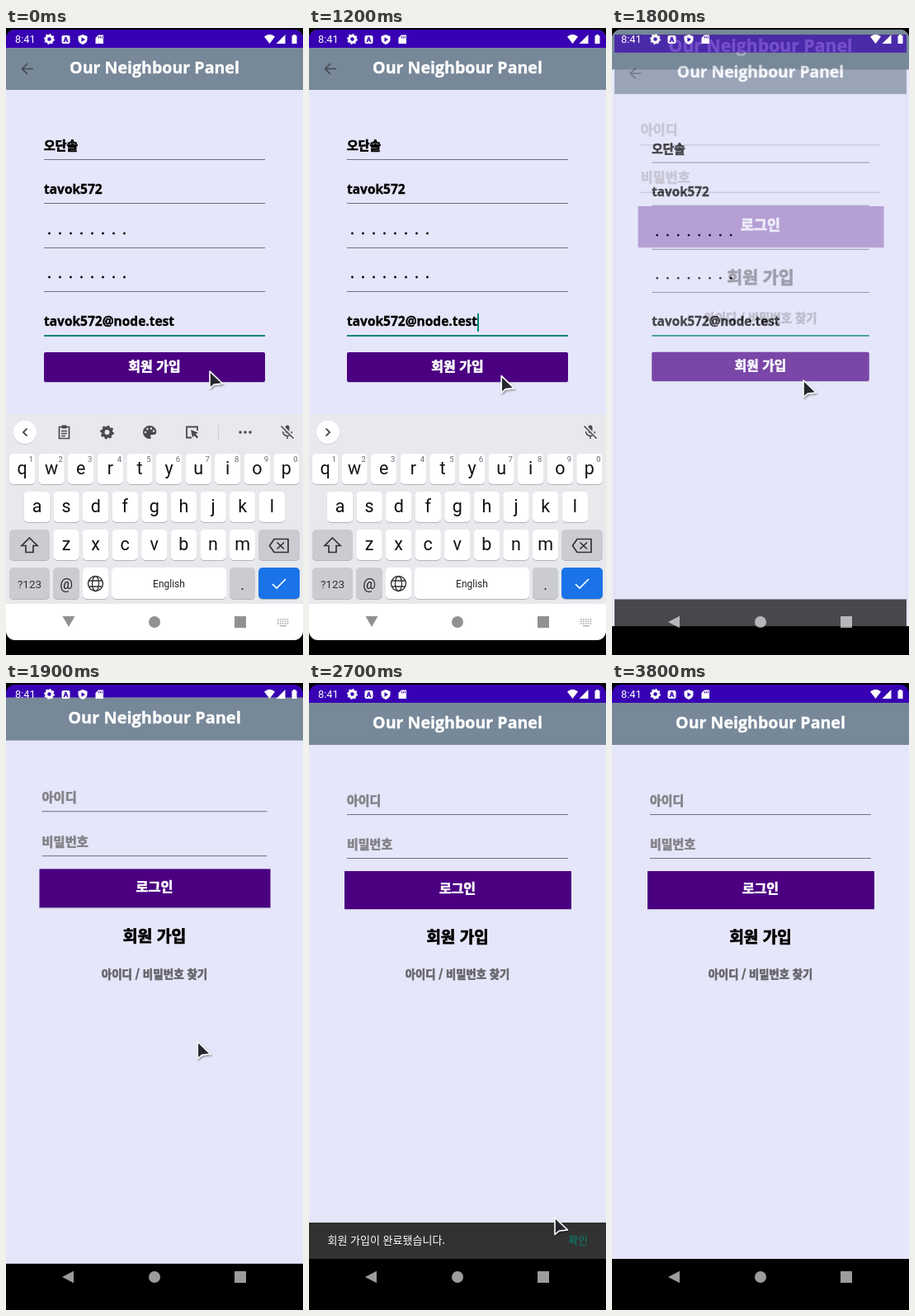
Recreate the animation shown at these times as an HTML page. Size 360x760 px, loop 4.5 s.

```html
<!DOCTYPE html>
<html lang="ko">
<head>
<meta charset="utf-8">
<title>Sign up</title>
<style>
  html, body { margin: 0; width: 100%; height: 100%; overflow: hidden; background: #000; }
  svg { display: block; width: 360px; height: 760px; }
  text { white-space: pre; }
  .bold { font-family: "Open Sans", "Noto Sans CJK KR", "Noto Sans CJK", sans-serif; font-weight: 700; stroke-width: .35; }
  .ko { font-family: "Noto Sans CJK KR", "Noto Sans CJK", sans-serif; font-weight: 900; stroke-width: .7; }
  .thin { font-family: "Noto Sans CJK KR", "Noto Sans CJK", sans-serif; font-weight: 400; stroke: none; }
  .key { font-family: Roboto, sans-serif; stroke: none; }
  .mid { text-anchor: middle; }
</style>
</head>
<body>
<svg id="stage" viewBox="0 0 360 760" xmlns="http://www.w3.org/2000/svg"></svg>
<script>
const LOOP = 4500, STEP = 100;
const INDIGO = '#4b0082', LAVENDER = '#e6e6fa', TEAL = '#018577', INK = '#4a4b50';

const rect = (x, y, w, h, fill, r = 0, more = '') =>
  `<rect x="${x}" y="${y}" width="${w}" height="${h}" rx="${r}" fill="${fill}" ${more}/>`;
const text = (s, x, y, size, color, cls) =>
  `<text x="${x}" y="${y}" font-size="${size}" fill="${color}" stroke="${color}" class="${cls}">${s}</text>`;
const circle = (x, y, r, fill, more = '') =>
  `<circle cx="${x}" cy="${y}" r="${r}" fill="${fill}" ${more}/>`;
const fillPath = (d, fill, more = '') => `<path d="${d}" fill="${fill}" ${more}/>`;
const linePath = (d, color, w) =>
  `<path d="${d}" fill="none" stroke="${color}" stroke-width="${w}"/>`;
const group = (id, body, more = '') => `<g id="${id}" ${more}>${body}</g>`;
const gear = (x, y, r, color) =>
  circle(x, y, r * .62, 'none', `stroke="${color}" stroke-width="${r * .5}"`) +
  circle(x, y, r * .86, 'none',
    `stroke="${color}" stroke-width="${r * .36}" pathLength="16" stroke-dasharray="1"`);

// App screens
const base = () =>
  rect(0, 2, 360, 758, '#000') +
  rect(0, 2, 360, 22, '#3700b3') +
  rect(0, 24, 360, 674, LAVENDER) +
  rect(0, 24, 360, 51, '#778899') +
  text('Our Neighbour Panel', 180, 55, 19.6, '#fff', 'bold mid');
const underline = y => rect(46, y, 268, 1, '#716f80');
const raised = (x, y, w, h, r) =>
  rect(x, y + 1, w, h, '#000', r, 'opacity=".2"') + rect(x, y, w, h, INDIGO, r);

const login = base() +
  text('아이디', 46, 148, 15, '#828288', 'ko') + underline(159) +
  text('비밀번호', 46, 201, 15, '#828288', 'ko') + underline(212) +
  raised(43, 228, 275, 46, 0) +
  text('로그인', 180, 255, 16, '#fff', 'ko mid') +
  text('회원 가입', 180, 315, 19, '#000', 'ko mid') +
  text('아이디 / 비밀번호 찾기', 180, 358, 13.3, '#66666c', 'ko mid');

const dots = y => Array.from({ length: 8 }, (_, i) => circle(52.5 + 13 * i, y, 1.4, '#000')).join('');
const form = base() +
  linePath('M33 49.5H19.5M26 43L19.5 49.5L26 56', '#44494f', 1.7) +
  text('오단솔', 46, 148, 14.9, '#000', 'ko') + underline(159) +
  text('tavok572', 46, 201, 15.5, '#000', 'bold') + underline(212) +
  dots(249) + underline(266) +
  dots(302) + underline(319) +
  text('tavok572@node.test', 46, 361, 15.5, '#000', 'bold') +
  rect(46, 372, 268, 2, TEAL) +
  rect(204, 346, 2, 22, TEAL, 0, 'id="caret"') +
  raised(46, 393, 268, 36, 2) +
  group('ripple', circle(232, 421, 120, '#000', 'opacity=".17"'), 'clip-path="url(#button)"') +
  text('회원 가입', 180, 415.5, 16, '#fff', 'ko mid');

const snack =
  rect(0, 654, 360, 44, '#323232') +
  group('snackText',
    text('회원 가입이 완료됐습니다.', 22.5, 680.3, 13, '#fff', 'thin') +
    text('확인', 314.5, 680.3, 12.7, TEAL, 'thin'));

// Keyboard
const GRAY = '#cbccd1', BOARD = '#e8e9ed';
const cap = (x, y, w, fill = '#fff', h = 37) =>
  rect(x, y + 1, w, h, '#b4b5ba', 5) + rect(x, y, w, h, fill, 5);
const row = (letters, x, y) => [...letters].map((c, i) => {
  const mid = x + 35.6 * i;
  return cap(mid - 15.7, y, 31.4) + text(c, mid, y + 25, 21.5, '#111', 'key mid');
}).join('');
const digits = [...'1234567890'].map((c, i) =>
  text(c, 30.5 + 35.6 * i, 526, 9.5, '#66686d', 'key mid')).join('');

const tools =
  // clipboard
  linePath('M64.5 483.5H76.5V497.5H64.5Z', INK, 1.7) + rect(67.5, 481.5, 6, 4, INK) +
  linePath('M67 488.5H74M67 491.5H74M67 494.5H72', INK, 1.3) +
  gear(122.5, 490, 8, INK) +
  // palette
  fillPath('M174 482a8 8 0 1 0 0 16c2 0 2-1.5 1.3-2.5c-.7-1.4 0-2.5 1.5-2.5h2a3.5 3.5 0 0 0 3.5-3.5c0-4.3-3.7-7.5-8.3-7.5z', INK) +
  [[169, 490], [171.5, 486], [176, 485.5], [179, 488.5]].map(p => circle(...p, 1.2, BOARD)).join('') +
  // touch panel
  linePath('M232 488V483.5H219V496.5H225', INK, 1.8) +
  fillPath('M224 487L233 490.5L230 492L233 496L231.5 497.5L228 494L226 496.5Z', INK) +
  rect(257, 481, 1, 18, '#cfd0d5') +
  [284, 290, 296].map(x => circle(x, 490, 1.8, INK)).join('');

const mic =
  rect(338.5, 481.5, 5, 10, INK, 2.5) +
  linePath('M335.5 489a5.5 5.5 0 0 0 11 0M341 494.5V498', INK, 1.5) +
  linePath('M334 482L349 497', BOARD, 3.5) + linePath('M333.5 482.5L348.5 497.5', INK, 1.6);

const keyboard =
  rect(0, 468, 360, 230, BOARD) + rect(0, 698, 360, 62, '#fff') +
  group('tools', tools) + mic +
  circle(23, 491, 14, '#c9cacf') + circle(23, 490, 14, '#fff') +
  group('chevron', linePath('M2.5 -4.5L-2 0L2.5 4.5', '#333', 1.7)) +
  row('qwertyuiop', 19.5, 516) + digits +
  row('asdfghjkl', 37.5, 562) +
  row('zxcvbnm', 73, 608) +
  cap(4, 608, 49, GRAY) + cap(306, 608, 50, GRAY) +
  linePath('M28.5 618L38 627.5H33V635.5H24V627.5H19Z', '#333', 1.7) +
  linePath('M325 619.5H342V635.5H325L319.5 627.5ZM328.5 623.5L337 631.5M337 623.5L328.5 631.5', '#333', 1.7) +
  cap(4, 654, 49, GRAY, 38) + text('?123', 28.5, 678.5, 13.5, '#333', 'key mid') +
  cap(57, 654, 32, GRAY, 38) + text('@', 73, 680, 17.5, '#222', 'key mid') +
  cap(93, 654, 31, '#fff', 38) +
  circle(108.5, 673.5, 9, 'none', 'stroke="#333" stroke-width="1.4"') +
  '<ellipse cx="108.5" cy="673.5" rx="4" ry="9" fill="none" stroke="#333" stroke-width="1.3"/>' +
  linePath('M100.5 670H116.5M100.5 677H116.5', '#333', 1.3) +
  cap(128, 654, 139, '#fff', 38) + text('English', 197.5, 678, 12, '#222', 'key mid') +
  cap(271, 654, 31, GRAY, 38) + text('.', 286.5, 681, 18, '#222', 'key mid') +
  cap(306, 654, 50, '#1a73e8', 38) +
  linePath('M323 674L328 679L339 668', '#fff', 1.7) +
  group('switcher',
    [0, 1, 2].map(j => [0, 1, 2, 3, 4].map(i =>
      rect(329 + i * 2.9, 716 + j * 2.6, 1.7, 1.5, '#aaa')).join('')).join('') +
    rect(332, 724, 8, 1.3, '#aaa'));

// System icons
const status =
  text('8:41', 11, 18, 12.8, '#fff', 'key') +
  gear(52.5, 13.5, 6.2, '#fff') +
  rect(67.5, 9, 10, 10, '#fff', 2) + text('A', 72.5, 17, 8, '#3700b3', 'bold mid') +
  fillPath('M93 8L98.5 10V14C98.5 17 96 19 93 20C90 19 87.5 17 87.5 14V10Z', '#fff') +
  fillPath('M91.5 11.2L96 14L91.5 16.8Z', '#3700b3') +
  fillPath('M112 8.5H118V19H108.5V12Z', '#fff') +
  linePath('M112.5 10V12.5M114.5 10V12.5M116.5 10V12.5', '#3700b3', .9) +
  fillPath('M313 10.5Q319.5 5 326 10.5L319.5 19Z', '#fff') +
  fillPath('M338.5 8V19H327.5Z', '#fff') +
  fillPath('M346.5 9.2H348V8H351V9.2H352.5V19H346.5Z', '#fff');
const nav =
  fillPath('M68 720L82 712.8V727.2Z', 'inherit', 'id="back"') +
  fillPath('M68.5 713H83.5L76 726Z', 'inherit', 'id="hide"') +
  circle(180, 720, 7, 'inherit') + rect(277, 713, 14, 14, 'inherit', .5);

const pointer = `<path d="M0 0V20.5L5.3 16L15.5 15Z" fill="#25282f" stroke="#fff"
  stroke-width="1.6" stroke-linejoin="round" filter="url(#shade)"/>`;

document.getElementById('stage').innerHTML =
  `<defs>
    <clipPath id="screen">${rect(0, 2, 360, 740, '#000', 11)}</clipPath>
    <clipPath id="app">${rect(0, 0, 360, 698, '#000')}</clipPath>
    <clipPath id="button">${rect(46, 393, 268, 36, '#000', 2)}</clipPath>
    <filter id="shade" x="-50%" y="-50%" width="200%" height="200%">
      <feDropShadow dx="1" dy="1.5" stdDeviation="1.3" flood-opacity=".4"/>
    </filter>
  </defs>` +
  rect(0, 0, 360, 760, '#000') +
  `<g clip-path="url(#screen)">` +
    group('login', login) +
    `<g clip-path="url(#app)">${group('snack', snack)}</g>` +
    group('form', form) + group('keyboard', keyboard) + status + group('nav', nav) +
  `</g>` + group('cursor', pointer);

// Motion: rows of [time, values...]
const track = {
  cursor: [[0, 247, 416], [700, 283, 446], [1250, 232, 421], [1700, 232, 421], [1800, 232, 427],
    [2100, 233, 457], [2300, 234, 456], [2600, 305, 636], [2800, 291, 660],
    [3200, 326, 682], [3300, 328, 686], [3400, 322, 676]],
  zoom: [[1700, 0], [1800, .17], [1900, .82], [2000, .95], [2200, 1]],
  fade: [[1700, 1], [1800, .69], [1900, 0]],
  fold: [[700, 0], [1100, 1]],
  snack: [[1900, 44], [2000, 20], [2100, 4], [2200, 0], [3400, 0], [3500, 4], [3600, 20], [3700, 38], [3800, 44]]
};
const smooth = k => k * k * (3 - 2 * k);
function at(rows, t, ease = k => k) {
  if (t <= rows[0][0]) return rows[0].slice(1);
  const i = rows.findIndex(r => r[0] >= t);
  if (i < 0) return rows[rows.length - 1].slice(1);
  const a = rows[i - 1], b = rows[i], k = ease((t - a[0]) / (b[0] - a[0]));
  return a.slice(1).map((v, n) => v + (b[n + 1] - v) * k);
}

const $ = id => document.getElementById(id);
const show = (id, on) => $(id).setAttribute('visibility', on ? 'inherit' : 'hidden');
const move = (id, value) => $(id).setAttribute('transform', value);
const scale = (id, s) => move(id, `translate(180 372) scale(${s}) translate(-180 -372)`);

function draw(t) {
  const [zoom] = at(track.zoom, t), [fade] = at(track.fade, t);
  scale('login', 1.1 - .1 * zoom);
  scale('form', 1 - .1 * zoom);
  $('form').setAttribute('opacity', fade);
  show('form', fade > 0);

  const typing = t < 1800;
  show('keyboard', typing);
  show('hide', typing);
  show('back', !typing);
  $('nav').setAttribute('fill', typing ? '#919191' : 'rgba(255,255,255,.61)');
  show('switcher', t < 1700);
  show('caret', (t >= 200 && t < 700) || (t >= 1200 && t < 1800));
  show('ripple', t >= 1700 && typing);

  const [fold] = at(track.fold, t, smooth);
  move('tools', `translate(${-60 * fold} 0)`);
  $('tools').setAttribute('opacity', Math.max(0, 1 - 1.4 * fold));
  move('chevron', `translate(23 490) rotate(${180 * fold})`);

  const [drop] = at(track.snack, t);
  move('snack', `translate(0 ${drop})`);
  $('snackText').setAttribute('opacity', Math.max(0, 1 - drop / 36));
  show('snack', drop < 44);

  const [x, y] = at(track.cursor, t, smooth);
  move('cursor', `translate(${x} ${y})`);
  show('cursor', t < 3800);
}

function tick() {
  const t = performance.now() % LOOP;
  draw(Math.floor(t / STEP) * STEP);
  requestAnimationFrame(tick);
}
tick();
</script>
</body>
</html>
```
